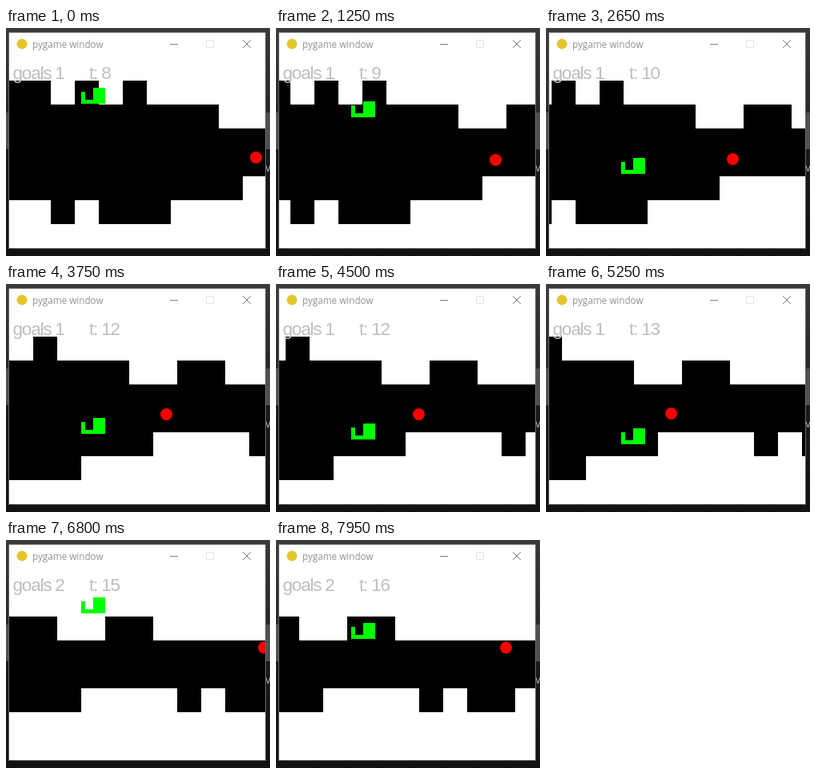
Recreate the animation shown at these times as an HTML page. Size 330 px wide and 286 px high, loop 8000 ms.

```html
<!DOCTYPE html>
<html lang="en">
<head>
<meta charset="utf-8">
<title>Cave game</title>
<style>
  html, body { margin: 0; width: 100%; height: 100%; overflow: hidden; background: #161616; }
  svg { display: block; width: 100%; height: 100%; }
  .crisp { shape-rendering: crispEdges; }
  .title { font: 11.7px "Open Sans", sans-serif; fill: #929292; }
  .score { font: 22.5px "Liberation Sans", Arial, sans-serif; letter-spacing: -1.2px; fill: #bebebe; }
</style>
</head>
<body>
<svg viewBox="0 0 330 286">
  <defs>
    <linearGradient id="desk" x1="0" y1="0" x2="0" y2="1">
      <stop offset="0" stop-color="#3b3a38"/>
      <stop offset=".37" stop-color="#282828"/>
      <stop offset=".54" stop-color="#1a1a1a"/>
      <stop offset="1" stop-color="#121212"/>
    </linearGradient>
    <clipPath id="view"><rect x="4" y="36" width="320" height="240"/></clipPath>
  </defs>

  <rect width="330" height="286" fill="url(#desk)"/>
  <rect class="crisp" y="106" width="330" height="46" fill="#505050"/>
  <text x="324" y="180" font-family="Open Sans, sans-serif" font-size="14" fill="#b4b4b4">v</text>

  <rect class="crisp" x="3" y="5" width="322" height="272" fill="#686868"/>
  <rect class="crisp" x="4" y="6" width="320" height="270" fill="#fff"/>
  <circle cx="20" cy="20" r="6.5" fill="#e3c62c"/>
  <text class="title" x="33" y="25">pygame window</text>
  <g fill="none" stroke="#7c7c7c">
    <path d="M205 20.5h10"/>
    <path d="M250.5 15.5h9v9h-9z" stroke="#e2e2e2"/>
    <path d="M296 15l10 10M306 15l-10 10"/>
  </g>

  <g clip-path="url(#view)">
    <path id="cave" class="crisp"/>
    <circle id="ball" r="7.5" fill="#f00"/>
    <path id="hero" class="crisp" fill="#0f0" d="M94 5h5v10h10V0h15v20H94z"/>
    <text id="goals" class="score" x="8.5" y="64"></text>
    <text id="clock" class="score" x="104" y="64"></text>
  </g>
</svg>
<script>
const LOOP = 8000, STEP = 50, CATCH = 6100;
const CELL = 30, LEFT = -4, SPEED = .0298;
const $ = id => document.getElementById(id);
const cave = $('cave'), ball = $('ball'), hero = $('hero'), goals = $('goals'), clock = $('clock');

// One digit per cave column: how many cells the edge lies below its highest level
const roof = '0010101112211222222';
const ground = '1121222111000010110';

// Motion keys: [ms, y]
const flight = [[0, 75], [1250, 92], [2650, 163], [3750, 168], [5250, 181], [5700, 181],
                [6800, 72], [7950, 104]];
const bob = [[0, 162.5], [1250, 165.5], [5250, 162.5]];

const linear = u => u;
const smooth = u => u * u * (3 - 2 * u);

function at(keys, t, ease = linear) {
  let i = 1;
  while (i < keys.length - 1 && t > keys[i][0]) i++;
  const [t0, a] = keys[i - 1], [t1, b] = keys[i];
  return a + (b - a) * ease(Math.min(1, (t - t0) / (t1 - t0)));
}

cave.setAttribute('d', [...roof].map((level, i) => {
  const top = 66 + CELL * level, bottom = 186 + CELL * ground[i];
  return `M${LEFT + CELL * i} ${top}h${CELL}V${bottom}h${-CELL}z`;
}).join(''));

const move = (el, x, y) => el.setAttribute('transform', `translate(${x} ${y})`);

// Steady scroll with a slight drift in pace
const scroll = t => Math.round(SPEED * t + .4 * Math.sin(2 * Math.PI * t / LOOP));

function draw(ms) {
  const t = Math.floor(ms / STEP) * STEP;
  const shift = scroll(t);
  const caught = t >= CATCH;
  move(cave, -shift, 0);
  if (caught) move(ball, 524.5 - shift, 135);
  else move(ball, 312.5 - shift, Math.floor(at(bob, t)) + .5);
  move(hero, 0, Math.round(at(flight, t, smooth)));
  goals.textContent = `goals ${caught ? 2 : 1}`;
  clock.textContent = `t: ${8 + Math.floor((t + 300) / 1006)}`;
}

const start = performance.now();
function tick() {
  draw((performance.now() - start) % LOOP);
  requestAnimationFrame(tick);
}
tick();
</script>
</body>
</html>
```
